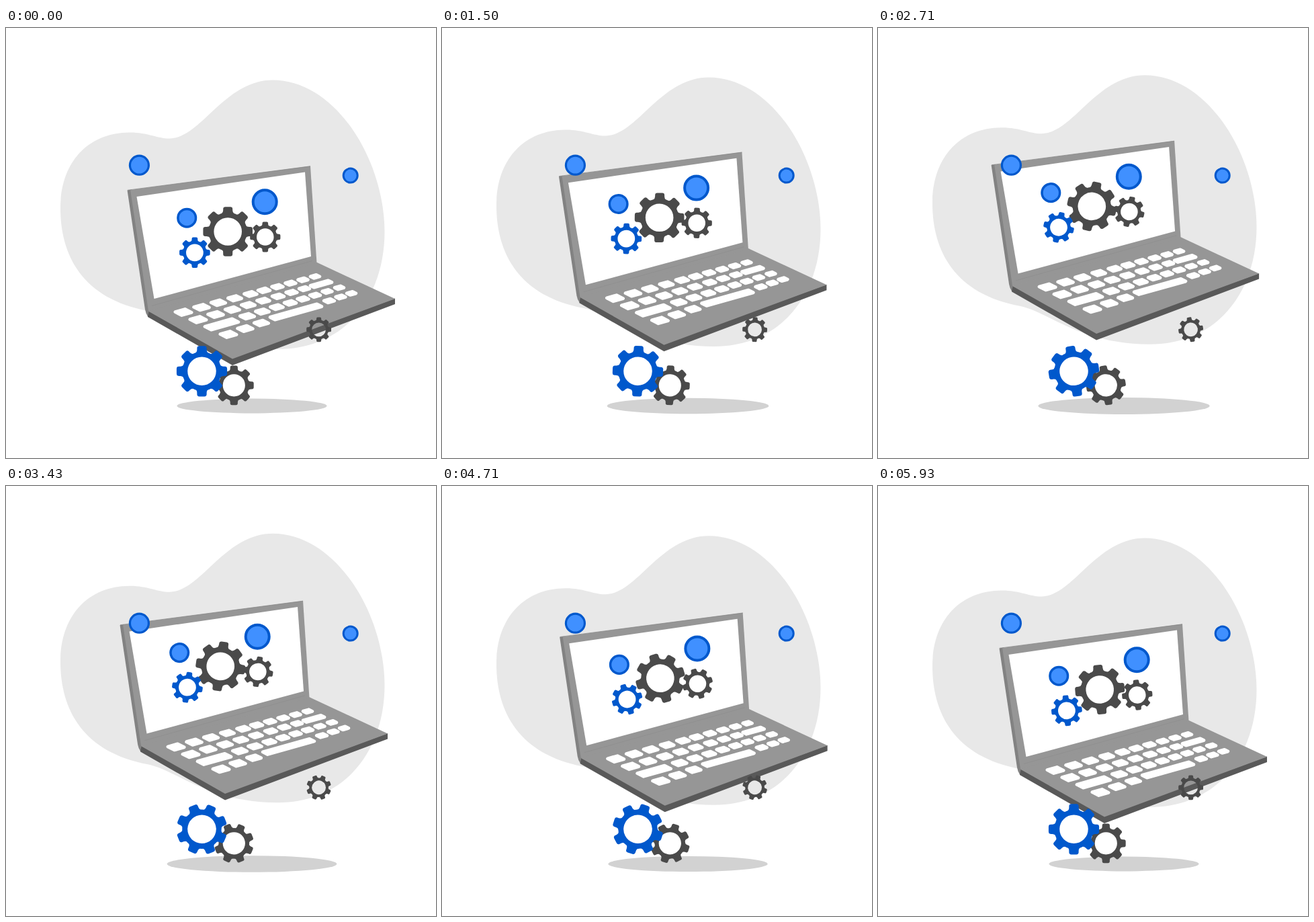
An HTML page that plays this animation: 640x640 px, repeating every 6 s.

```html
<!DOCTYPE html>
<html lang="en">
<head>
<meta charset="utf-8">
<title>Floating laptop</title>
<style>
html, body { margin: 0; width: 100%; height: 100%; overflow: hidden; background: #fff; }
svg { display: block; width: 100vw; height: 100vh; }
.blue { --c: #0058cc; }
.dark { --c: #4a4a4a; }
.dot { fill: #4090ff; stroke: #0058cc; }
.keys { fill: #fff; stroke: #fff; stroke-width: 5; stroke-linejoin: round; }
</style>
</head>
<body>
<svg viewBox="0 0 640 640">
  <defs>
    <g id="gear">
      <circle r="67" fill="none" stroke="var(--c)" stroke-width="21"/>
    </g>
  </defs>
  <path id="blob" fill="#e8e8e8" d="M81 268C81 200 122 156 183 155.500C210 155 225 164.500 243 164.500C290 164.500 325 77.500 397 77.500C490 77.500 563 195 563.500 303C563.500 400 505 478 405 478C300 478 255 430 211 421C115 403 81 340 81 268Z"/>
  <ellipse id="shadow" cx="366" cy="562.500" fill="#d2d2d2"/>
  <g id="laptop">
    <path fill="#595959" d="M210 420L337 491L579 402.500V411L337 502L211 430Z"/>
    <path fill="#969696" d="M211 421L220 403L458 347L463 349L579 403L337 492.500Z"/>
    <path fill="#828282" d="M180.500 241.500L187 240.500L214 416L211 429Q208 425 207 419Z"/>
    <path fill="#969696" d="M185 241L453 205.500L462.500 350L212 421.500Z"/>
    <path fill="none" stroke="#828282" stroke-width=".7" d="M181 241.300L453 205.700"/>
    <path fill="none" stroke="#8e8e8e" stroke-width=".8" d="M217 413.500L456 346.500"/>
    <path fill="#fff" d="M194.500 251L445 214.500L454 340L220.500 403Z"/>
    <g id="keys" class="keys"></g>
    <g id="screen"></g>
    <circle class="dot" cx="385.200" cy="258.800" r="17.500" stroke-width="4"/>
    <circle class="dot" cx="269.200" cy="282.700" r="13.300" stroke-width="3.500"/>
  </g>
  <circle class="dot" cx="198.400" cy="204.200" r="14" stroke-width="3.200"/>
  <circle class="dot" cx="512.700" cy="219.600" r="10.500" stroke-width="3"/>
  <g id="floor"></g>
</svg>
<script>
const $ = id => document.getElementById(id);

function add(parent, tag, attrs) {
  const el = document.createElementNS('http://www.w3.org/2000/svg', tag);
  for (const k in attrs) el.setAttribute(k, attrs[k]);
  return parent.appendChild(el);
}

for (let a = 0; a < 360; a += 45) {
  add($('gear'), 'path', {
    fill: 'var(--c)', transform: `rotate(${a})`,
    d: 'M-26-72Q-19-76-19-86V-91Q-19-100-10-100H10Q19-100 19-91V-86Q19-76 26-72Z'
  });
}

function gear(parent, cls, x, y, r) {
  const el = add($(parent), 'use', { href: '#gear', class: cls });
  return angle => el.setAttribute('transform',
    `translate(${x} ${y}) scale(${r / 100}) rotate(${angle})`);
}
const screenGears = [
  gear('screen', 'dark', 330.2, 303, 36.8),
  gear('screen', 'dark', 385.8, 311, 22.6),
  gear('screen', 'blue', 280.9, 334.3, 22.8)
];
const floorGears = [
  gear('floor', 'dark', 339.3, 531.8, 29.4),
  gear('floor', 'blue', 291.5, 510.8, 37.6),
  gear('floor', 'dark', 465.6, 448.8, 18.4)
];

// Keys are sheared boxes that shrink towards the far side of the keyboard.
function key(x, y, width) {
  const far = (0.5 * (x - 264) - (y - 423)) / 0.78;
  const k = 1 - 0.33 * far / 195;
  const a = (width || 18 * k) / 2 - 1.8, b = 7 * k - 2.2;
  const corner = (s, t) => `${x + s * a + t * b} ${y - 0.28 * s * a + 0.5 * t * b}`;
  add($('keys'), 'path', {
    d: `M${corner(-1, -1)}L${corner(1, -1)}L${corner(1, 1)}L${corner(-1, 1)}Z`
  });
}
function row(y, slope, xs) {
  xs.forEach(x => key(x, y + slope * (x - xs[0])));
}
row(423, -0.271, [264, 291, 316, 340.5, 364, 384, 404, 423.5, 442, 460]);
row(434, -0.291, [286, 312, 337, 360.5, 383, 405, 425, 444]);
row(429, -0.31, [359, 381.5, 403, 423, 442, 460, 478, 496]);
row(456, -0.345, [331, 356, 380]);
row(406, -0.335, [481, 498, 514]);
key(469, 381, 30);
key(321, 441, 44);
key(431.5, 422.5, 73);

// Time in seconds and angle: the lower gears turn once, overshoot and settle.
const turn = [[0, 0], [0.86, 42.5], [1.5, 92], [2.71, 216], [4.21, 364], [5.21, 375], [5.93, 360]];

function floorAngle(t) {
  let n = 0;
  while (n < turn.length - 2 && t > turn[n + 1][0]) n++;
  const slope = j => {
    const p = turn[Math.max(j - 1, 0)], q = turn[Math.min(j + 1, turn.length - 1)];
    return (q[1] - p[1]) / (q[0] - p[0]);
  };
  const [t0, a0] = turn[n], [t1, a1] = turn[n + 1];
  const h = t1 - t0, u = Math.min((t - t0) / h, 1), v = 1 - u;
  return a0 * v * v * (1 + 2 * u) + a1 * u * u * (3 - 2 * u)
    + h * u * v * (v * slope(n) - u * slope(n + 1));
}

const LOOP = 6000, STEPS = 84;

function draw(now) {
  const step = Math.floor((now % LOOP) / LOOP * STEPS + 0.05) % STEPS;
  const t = step * LOOP / STEPS;
  const lift = 1 - Math.abs(step / 41.5 - 1);
  $('laptop').setAttribute('transform', `translate(${-13 * lift} ${-41 * lift})`);
  $('blob').setAttribute('transform', `translate(0 ${-8 * lift})`);
  $('shadow').setAttribute('rx', 111.5 + 17.6 * lift);
  $('shadow').setAttribute('ry', 10.9 + 1.7 * lift);
  screenGears.forEach(spin => spin(t * 0.1206));
  const angle = floorAngle(t / 1000);
  floorGears.forEach(spin => spin(angle));
}

const start = performance.now();
function tick() {
  draw(performance.now() - start);
  requestAnimationFrame(tick);
}
tick();
</script>
</body>
</html>
```
